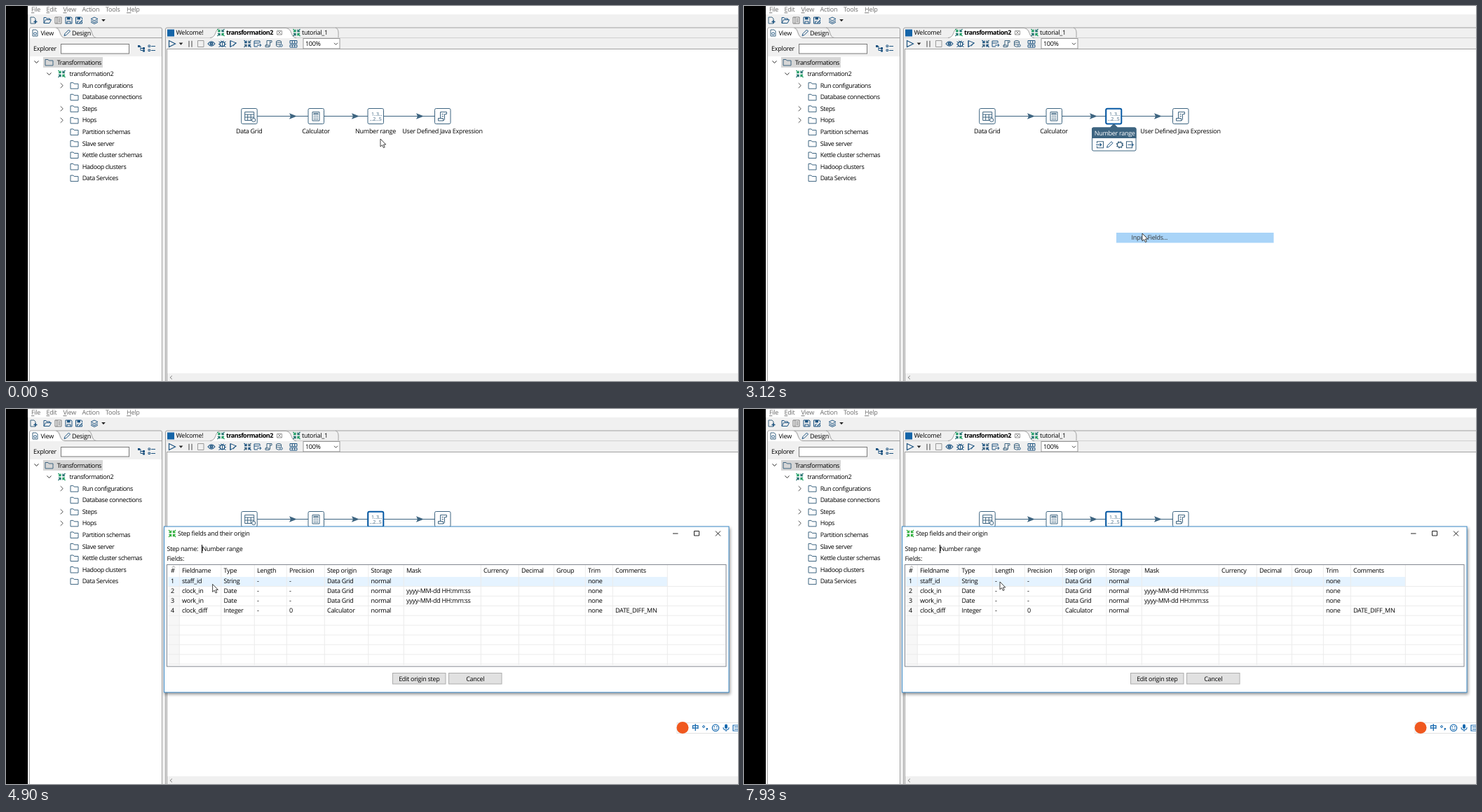
An HTML page for the animation above (8 s loop, 1044 by 536 pixels).

```html
<!DOCTYPE html>
<html lang="en">
<head>
<meta charset="utf-8">
<title>Step fields</title>
<style>
html, body { margin: 0; width: 100%; height: 100%; overflow: hidden; background: #fff; }
svg { display: block; width: 100%; height: 100%; }
text { font: 9px "Open Sans", "Noto Sans", "Noto Sans CJK SC", sans-serif; letter-spacing: -.28px; white-space: pre; text-rendering: geometricPrecision; }
.tree text { letter-spacing: -.39px; }
</style>
</head>
<body>
<svg id="stage" viewBox="0 0 1044 536"></svg>
<script>
const BLUE = '#3d6480', NAVY = '#1c5380', LOOP = 8000;

// Drawing helpers
const rect = (x, y, w, h, fill, extra = '') => `<rect x="${x}" y="${y}" width="${w}" height="${h}" fill="${fill}" ${extra}/>`;
const text = (x, y, s, fill = '#000', extra = '') => `<text x="${x}" y="${y + 3.1}" fill="${fill}" ${extra}>${s}</text>`;
const line = (d, color = NAVY, w = 1, fill = 'none') => `<path d="${d}" stroke="${color}" stroke-width="${w}" fill="${fill}"/>`;
const solid = (d, color = NAVY) => `<path d="${d}" fill="${color}"/>`;
const circle = (x, y, r, color = NAVY, w = 1) => `<circle cx="${x}" cy="${y}" r="${r}" fill="none" stroke="${color}" stroke-width="${w}"/>`;
const group = (id, body, extra = '') => `<g id="${id}" ${extra}>${body}</g>`;
const at = (x, y, body, s = 1) => `<g transform="translate(${x} ${y}) scale(${s})">${body}</g>`;
const stroked = color => `stroke="${color}"`;

// Icons, centred on 0,0
const converge = (a, b) => [0, 90, 180, 270].map(r =>
  `<g transform="rotate(${r})">${line('M-5-5L-1.8-1.8M-1.5-4.6V-1.5H-4.6', r % 180 ? b : a, 1.3)}</g>`).join('');
const transIcon = converge('#1b9c62', '#23716f');
const folder = line('M-5.5 4V-4H-1.5L-.3-2.5H5.5V4.5H-5.5Z', BLUE);
const chevron = line('M-1.8-3.5L1.8 0-1.8 3.5', '#555');
const chevronDown = line('M-3-1.6L0 1.6 3-1.6', '#333');
const dropArrow = solid('M-2.8-1.5H2.8L0 1.8Z', '#222');
const page = line('M-3.5-4.5H1.5L3.5-2.5V4.5H-3.5Z', BLUE);
const disk = line('M-4.5-4.5H3.5L4.5-3.5V4.5H-4.5Z') + solid('M-2.5-4.5H2V-1H-2.5Z') + line('M-2.5 4.5V1.5H2.5V4.5');
const pencil = line('M-4 4L-3 1 2.5-4.5 4.5-2.5-1 3Z', NAVY);
const sheet = line('M-2.5-4.5H4.5V-2H2V3.5L.5 4.5H-4.5V2H-2.5ZM-4.5 2H.5V4.5M2-2V-3.5', BLUE);
const database = `<ellipse cx="-1" cy="-3.2" rx="3.5" ry="1.4" fill="none" stroke="${BLUE}"/>` + line('M-4.5-3V3Q-1 5 1 4M2.5-3V0M-4.5 0Q-1 2 1 .7', BLUE) + circle(2.5, 2.5, 1.7);
const gear = circle(0, 0, 3.5, BLUE, 1.2) + `<circle r="4.5" fill="none" stroke="${BLUE}" stroke-width="1.4" stroke-dasharray="1.8 1.73"/>`;
const scroll = line('M-3-6H6V-3H3V5L1 6.5H-6V3H-3ZM-6 3H1V6.5M-1-3H1.5M-1 0H1.5', BLUE, 1);
const calc = line('M-5-6H5V6.5H-5ZM-3-4H3V-2.5H-3Z', BLUE) + line('M-3 0H3M-3 2.2H3M-3 4.4H3', BLUE, 1.1).replace('/>', ' stroke-dasharray="1.4 .9"/>');
const grid = line('M-6-6H7V6H-6ZM-6-2.5H7M-6 1.5H7M-2-2.5V6M2.5-2.5V6', BLUE) + `<circle cx="6.5" cy="5.5" r="2.6" fill="#fff" stroke="${BLUE}"/>`;
const numbers = text(-6, -4, '1..3...', BLUE, 'style="font-size:7px"') + text(-8.5, 3.5, '...2...5', BLUE, 'style="font-size:7px"');

function menuBar() {
  const items = [['File', 36], ['Edit', 57.5], ['View', 81.5], ['Action', 108.5], ['Tools', 142], ['Help', 172]];
  return items.map(([s, x]) => text(x, 5.2, `<tspan text-decoration="${/[AT]/.test(s[0]) ? 'none' : 'underline'}">${s[0]}</tspan>${s.slice(1)}`, 'inherit')).join('');
}

function mainToolbar() {
  return at(38.5, 20.5, page + line('M1 2H6M3.5-.5V4.5', NAVY, 1.3)) +
    at(59, 20.5, line('M-5 4V-4H-2L-1-2.5H3.5V-1M-5 4L-2.5-.8H5.5L3 4Z')) +
    at(74.5, 20.5, line('M-4.5-4.5H4.5V4.5H-4.5ZM-1.7-4.5V4.5M0-2H3M0 0H3M0 2H3', '#777')) +
    at(89.5, 20.5, disk) + at(104, 20.5, disk + line('M0 4L5-1', '#fff', 3) + line('M0 4.5L5-.5', NAVY, 1.3)) +
    at(126, 20.5, line('M-5-2L0-4.5 5-2 0 .5ZM-5 .5L0 3 5 .5M-5 2.7L0 5 5 2.7')) + at(139, 20.5, dropArrow);
}

function leftPanel() {
  const names = ['Run configurations', 'Database connections', 'Steps', 'Hops', 'Partition schemas', 'Slave server', 'Kettle cluster schemas', 'Hadoop clusters', 'Data Services'];
  const rows = names.map((name, i) => {
    const y = 113.7 + i * 16.55;
    return ([0, 2, 3].includes(i) ? at(79.5, y, chevron) : '') + at(97.5, y, folder) + text(108.7, y, name);
  }).join('');
  return rect(33, 30, 190, 506, '#f0f0f0') + rect(34, 72, 188, 464, '#fff') +
    line('M33.5 536V33Q33.5 31 36 31H220Q222.5 31 222.5 33V536M72 31.5C78 32 76 45.5 84 45.5H222', '#a0a0a0') +
    solid('M34 46V33Q34 31.5 36 31.5H70C76 33 75 45 83 46Z', '#fff') +
    line('M117 31C124 32 121 45 129 45.5', '#a0a0a0') +
    at(41.5, 38.5, page + circle(0, 1, 1.8)) + text(49.5, 38.5, 'View') +
    at(87, 38.5, pencil) + text(94, 38.5, 'Design') +
    text(39, 60.8, 'Explorer') + rect(78.5, 54.5, 97, 13.5, '#fff', stroked('#7a7a7a')) +
    at(193, 60.5, line('M-4-3H-1V3H4M-1 0H4') + solid('M-5-4.5H-2V-1.5H-5ZM2-1.5H5V1.5H2ZM2 2H5V5H2Z')) +
    at(208, 60.5, line('M-1-3H5M-1 3H5', NAVY, 1.2) + line('M-5-4.5H-2.5V-2H-5ZM-5 1.5H-2.5V4H-5Z')) +
    `<g class="tree">${rect(53, 73, 85, 15, '#d6d6d6')}${at(43.5, 80, chevronDown)}${at(61.5, 80.5, folder)}${text(72.7, 80.4, 'Transformations')}
    ${at(61.5, 97, chevronDown)}${at(79.5, 97, transIcon)}${text(90.5, 97, 'transformation2')}${rows}</g>`;
}

function editorFrame() {
  const grey = '#9a9a9a';
  return rect(223, 30, 821, 32, '#f0f0f0') + rect(223, 30, 6, 506, '#f0f0f0') + line('M227.5 536V33Q227.5 31 230 31H1044', '#a0a0a0') +
    line('M229.5 62V536M229 61.5H1044', '#a0a0a0') + line('M229 45.5H1044', '#d0d0d0') +
    solid('M291 46C301 45 297 32 306 31.5H399C409 32 405 45 414 46Z', '#fff') +
    line('M291 45.5C301 45 297 32 306 31.5H399C409 32 405 45 414 45.5M470 31C475 33 474 38 474 45', '#a0a0a0') +
    rect(230, 33.5, 10, 10, '#1565a8') + text(242.5, 38.3, 'Welcome!') +
    at(306.5, 38, transIcon) + text(314, 38.3, 'transformation2', '#000', 'style="font-weight:700;letter-spacing:-.5px"') +
    line('M387 35L393 41M393 35L387 41M386.5 35.5H393.5V41H386.5Z', '#999') +
    at(414.5, 38, transIcon) + text(422, 38.3, 'tutorial_1') +
    at(236.5, 54, line('M-4-4.5L5 0-4 4.5Z', NAVY, 1.2)) + at(249.5, 54, dropArrow) +
    line('M260.5 50V58.5H261.5V50ZM264.5 50V58.5H265.5V50Z', grey) + line('M273.5 49.5H282V58.5H273.5Z', grey) +
    at(293, 54, line('M-5 0Q0-6.5 5 0Q0 6.5-5 0Z', NAVY, 1.2) + circle(0, 0, 1.6, NAVY, 1.7)) +
    at(308.5, 54, circle(0, .5, 3.3, NAVY, 1.2) + line('M-5-3L-3-2M5-3L3-2M-5.5.5H-3M5.5.5H3M-5 4.5L-2.5 3M5 4.5L2.5 3M-2-4.5L0-2.5 2-4.5M0-2V4')) +
    at(324, 54, line('M-4-4.5L4.5-1-4 4.5ZM-4-4.5V5M0 3.5L4-2') ) +
    at(344.5, 54, converge(NAVY, BLUE)) +
    at(359, 54, line('M-5-4H3V-1M-5-4V4H0M-5-1H2M-1 2H5M3 0L5 2 3 4')) +
    at(374.5, 54, sheet) + at(390, 54, database) +
    at(410, 54, line('M-5-4.5H5V-.5H-5ZM-5 1.5H5V5H-5ZM-1.7-4.5V-.5M1.7-4.5V-.5M-1.7 1.5V5M1.7 1.5V5')) +
    rect(424, 46.5, 52, 14.5, '#fff', stroked('#999')) + text(427, 54, '100%') + at(470.5, 54, line('M-2.5-1.2L0 1.3 2.5-1.2', '#444')) +
    rect(230, 525, 814, 11, '#f0f0f0') + line('M237 528.5L234 531 237 533.5', '#888');
}

function flow() {
  const steps = [[346.7, 'Data Grid', grid], [442, 'Calculator', calc], [527, 'Number range', numbers], [622.5, 'User Defined Java Expression', scroll]];
  const hops = [[358, 431, 404], [453.5, 516, 493], [538.5, 611, 585]];
  return hops.map(([a, b, x]) => line(`M${a} 157.5H${b}`, BLUE, 1.1) + solid(`M${x} 153.3L${x + 11} 157.5 ${x} 161.7 ${x + 2} 157.5Z`, BLUE)).join('') +
    steps.map(([x, name, icon]) => rect(x - 11, 146.5, 22.5, 22, '#fff', stroked(BLUE) + ' rx="2"') + at(x, 157.5, icon) +
      text(x, 178.6, name, '#000', 'text-anchor="middle"')).join('');
}

function hint() {
  const box = line('M0-4.5H-4V4.5H5V-4.5H2', BLUE, 1.1);
  const arrow = line('M-6 0H1.5M-.5-2.2L1.7 0-.5 2.2', NAVY, 1.1);
  return rect(496.5, 174, 62.5, 33, '#fff', stroked(BLUE) + ' rx="2"') + solid('M496 189V176Q496 173.5 498 173.5H522L527.5 168 533 173.5H557Q559.5 173.5 559.5 176V189Z', BLUE) +
    text(499.7, 182.3, 'Number range', '#fff') +
    at(508, 198.3, line('M-4.5-2V-4.5H4.5V4.5H-4.5V2', BLUE, 1.1) + arrow) + at(521.5, 198.3, pencil) + at(536, 198.3, gear) +
    at(550, 198.3, line('M3.5-2V-4.5H-4.5V4.5H3.5V2', BLUE, 1.1) + at(3.5, 0, arrow));
}

// Context menu: "-" prefix = disabled, ">" suffix = submenu, "|" = shortcut, "" = separator
const menuItems = [];
let menuY = 171.5;
for (const s of ['-New Hop...', 'Edit...', 'Description...', '', 'Data Movement>', 'Change Number of Copies to Start...', '', 'Copy|CTRL-C', 'Duplicate', 'Delete|DEL', '-Hide', 'Detach', '',
  'Input Fields...', 'Output Fields...', '-Sniff Test During Execution>', '', 'Check Selected Step(s)', '', 'Error Handling...', 'Preview...', '', '-Align / Distribute>', '',
  'Data Services>', 'Mapping...', '-Partitions...', 'Clusters...']) {
  menuItems.push({ s, y: menuY });
  menuY += s ? 14.65 : 4.45;
}
function menuBody() {
  return rect(532, 166, 227, 341, '#000', 'opacity=".3" filter="url(#soft)"') + rect(529.5, 163, 228, 342, '#f2f2f2', stroked('#bdbdbd')) +
    rect(531, 0, 224.5, 14.6, '#91c9f7', 'id="menuHot"') +
    menuItems.map(({ s, y }) => {
      if (!s) return line(`M549 ${y - 5.1}H755`, '#d2d2d2');
      const off = s[0] === '-', color = off ? '#7d7d7d' : '#000';
      const [label, key] = s.replace(/^-|>$/g, '').split('|');
      return text(552.5, y, label, color) + (key ? text(743.5, y, key, color, 'text-anchor="end"') : '') +
        (s.endsWith('>') ? line(`M746 ${y - 2.5}L748.8 ${y} 746 ${y + 2.5}`, color) : '');
    }).join('');
}

// Dialog
const columns = [231, 247, 306.5, 354, 400, 454, 516.5, 567, 677, 731, 781, 826, 865, 943];
const heads = ['#', 'Fieldname', 'Type', 'Length', 'Precision', 'Step origin', 'Storage', 'Mask', 'Currency', 'Decimal', 'Group', 'Trim', 'Comments'];
const ROW_TOP = 240, ROW_H = 13.9;
const stamp = 'yyyy-MM-dd HH:mm:ss';
const records = [
  ['staff_id', 'String', '-', '-', 'Data Grid', ''],
  ['clock_in', 'Date', '-', '-', 'Data Grid', stamp],
  ['work_in', 'Date', '-', '-', 'Data Grid', stamp],
  ['clock_diff', 'Integer', '-', '0', 'Calculator', '', 'DATE_DIFF_MN']
];
function dialogBody() {
  const cells = records.map(([name, type, len, prec, origin, mask, note = ''], i) =>
    [i + 1, name, type, len, prec, origin, 'normal', mask, '', '', '', 'none', note]
      .map((s, c) => text(columns[c] + 4, 246.2 + i * ROW_H, s)).join('')).join('');
  let lines = '';
  for (let i = 1; i < 10; i++) lines += `M231 ${(ROW_TOP + i * ROW_H - .4).toFixed(1)}H1026`;
  for (const x of columns.slice(1)) lines += `M${x + .3} 223V366`;
  const button = (x, s) => rect(x, 377.5, 75.5, 15.5, '#e1e1e1', stroked('#adadad')) + text(x + 37.8, 385.4, s, '#000', 'text-anchor="middle"');
  return rect(226, 170, 807, 238, '#000', 'opacity=".4" filter="url(#soft)"') + rect(225.5, 168, 805.5, 237, '#fff', stroked('#3a8ac8')) +
    at(237, 178, converge('#2fae3c', '#2fae3c')) + text(245, 178, 'Step fields and their origin') +
    line('M951 178H958.5M981.5 174.5H988.5V181H981.5ZM1012 174.5L1019 181.5M1019 174.5L1012 181.5', '#222') +
    text(229.5, 200, 'Step name:') + text(279.5, 200, 'Number range') + text(229.5, 214, 'Fields:') +
    rect(229.5, 222.5, 797.5, 145.5, '#fff', stroked('#828790')) + rect(231, 240, 16, 126, '#f7f7f7') +
    rect(0, 223, 0, 16.5, '#d9ebf9', 'id="headHot"') + rect(231, 0, 712, ROW_H - .5, '#e5f3ff', 'id="rowHot"') +
    line(lines, '#ececec') + line('M237 226.5L239 224.5 241 226.5', '#777', .8) +
    heads.map((s, c) => text(columns[c] + 4, 231.2, s)).join('') + cells +
    button(551.5, 'Edit origin step') + button(631.5, 'Cancel') + rect(279, 194, 1, 12, '#000', 'id="caret"');
}

function inputBar() {
  const c = '#1467ad';
  return rect(957, 448.5, 90, 15, '#fff', stroked('#e2e2e2')) + `<circle cx="965" cy="455.5" r="8.5" fill="#f0581f"/>` +
    text(978, 455.6, '中', c, 'style="font-size:10.5px;font-weight:700"') + circle(995, 454, 1.4, c) + solid('M998.5 456H1001Q1001 459 998.5 459.5L999 458Z', c) +
    circle(1012, 455.8, 4.7, c, 1.2) + solid('M1009.5 453.5H1011V455H1009.5ZM1013 453.5H1014.5V455H1013Z', c) + line('M1009.3 457Q1012 460 1014.7 457', c) +
    rect(1025, 450.5, 4, 6.5, c, 'rx="2"') + line('M1023 455Q1023 458.8 1027 458.8T1031 455M1027 459V461', c, 1.1) +
    line('M1037 452H1048V460H1037ZM1039 454.5H1044M1039 457.5H1044', c, 1.2);
}

const stage = document.getElementById('stage');
stage.innerHTML = `<defs><filter id="soft" x="-5%" y="-5%" width="110%" height="110%"><feGaussianBlur stdDeviation="2.2"/></filter></defs>` +
  rect(0, 0, 1044, 536, '#fff') + rect(31, 12, 1013, 18.5, '#f0f0f0') + group('bar', menuBar()) + mainToolbar() +
  leftPanel() + editorFrame() + rect(0, 0, 31, 536, '#000') + line('M31.5 12V536', '#d8d8d8') + flow() +
  group('selected', rect(516.3, 146.8, 22, 21.6, 'none', stroked('#075aa5') + ' stroke-width="2" rx="2"')) +
  group('hint', hint()) + group('dialog', dialogBody()) + group('ime', inputBar()) + group('menu', menuBody()) +
  group('chosen', rect(531, 324, 224.5, 14.5, '#91c9f7') + text(552.5, 331.3, 'Input Fields...')) +
  group('cursor', '<path d="M0 0V11L2.6 8.7 4.4 12.6 6.2 11.8 4.5 8H7.8Z" fill="#fff" stroke="#222" stroke-width=".85"/>');
const el = {};
stage.querySelectorAll('[id]').forEach(node => el[node.id] = node);

// Bursts of movement [start, end, steps] and the pointer path [time, x, y]
const bursts = [[70, 550, 7], [1480, 2260, 11], [2350, 2820, 7], [3810, 4590, 11], [4670, 5450, 11], [5530, 5830, 5], [6150, 6920, 11], [7320, 7550, 4], [7700, 7930, 4]];
const path = [[0, 534, 190], [550, 530, 162], [1405, 530, 162], [1640, 558, 225], [1792, 567, 267], [2260, 568, 311], [2430, 568, 314], [2820, 568, 325],
  [3735, 568, 325], [4356, 325, 240], [4434, 314, 236], [4590, 304, 237], [4900, 295, 250], [5130, 275, 274], [5450, 261, 254], [5830, 262, 283],
  [6075, 262, 283], [6458, 413, 284], [6690, 534, 286], [6920, 420, 287], [7245, 420, 287], [7550, 390, 311], [7625, 390, 311], [7930, 365, 247]];

function pointer(t) {
  let q = 0;
  for (const [a, b, n] of bursts) {
    const step = (b - a) / (n - 1);
    if (t >= a) q = a + step * Math.min(n - 1, Math.floor((t - a) / step + .1));
  }
  const i = Math.max(1, path.findIndex(p => p[0] >= q));
  const [t0, x0, y0] = path[i - 1], [t1, x1, y1] = path[i];
  const k = (q - t0) / (t1 - t0);
  return [x0 + (x1 - x0) * k, y0 + (y1 - y0) * k];
}

const show = (node, on) => node.setAttribute('opacity', +on);
const stepped = (t, times, values) => values[times.filter(v => t >= v).length];

function render(t) {
  const [x, y] = pointer(t);
  const menuOpen = t >= 700 && t < 3050;
  const dialogAlpha = stepped(t, [3400, 3480, 3560], [0, .4, .8, 1]);
  el.cursor.setAttribute('transform', `translate(${x.toFixed(2)} ${y.toFixed(2)})`);
  el.bar.setAttribute('fill', menuOpen ? '#000' : '#6a6a6a');
  show(el.selected, t >= 700);
  show(el.hint, t >= 470 && dialogAlpha < 1);
  show(el.menu, menuOpen ? stepped(t, [780, 850], [.4, .8, 1]) : 0);
  show(el.ime, menuOpen || t >= 3560);
  show(el.chosen, stepped(t, [3050, 3115, 3200, 3280], [0, .9, .78, .4, 0]));
  show(el.dialog, dialogAlpha);

  const hot = t >= 1480 && menuItems.find(m => m.s && Math.abs(m.y - y) <= 7.33);
  show(el.menuHot, !!hot);
  if (hot) {
    el.menuHot.setAttribute('y', hot.y - 7.3);
    el.menuHot.setAttribute('fill', hot.s[0] === '-' ? '#e3e3e3' : '#91c9f7');
  }
  const row = Math.floor((y - ROW_TOP) / ROW_H);
  show(el.rowHot, row >= 0 && row < records.length);
  el.rowHot.setAttribute('y', ROW_TOP + row * ROW_H);
  const col = columns.findIndex((c, i) => x >= c && x < columns[i + 1]);
  const onHead = y >= 223 && y < ROW_TOP && col >= 0;
  show(el.headHot, onHead);
  if (onHead) {
    el.headHot.setAttribute('x', columns[col]);
    el.headHot.setAttribute('width', columns[col + 1] - columns[col]);
  }
  show(el.caret, Math.floor((t - 3440) / 532) % 2 === 0);
}

function tick() {
  render(performance.now() % LOOP);
  requestAnimationFrame(tick);
}
tick();
</script>
</body>
</html>
```
